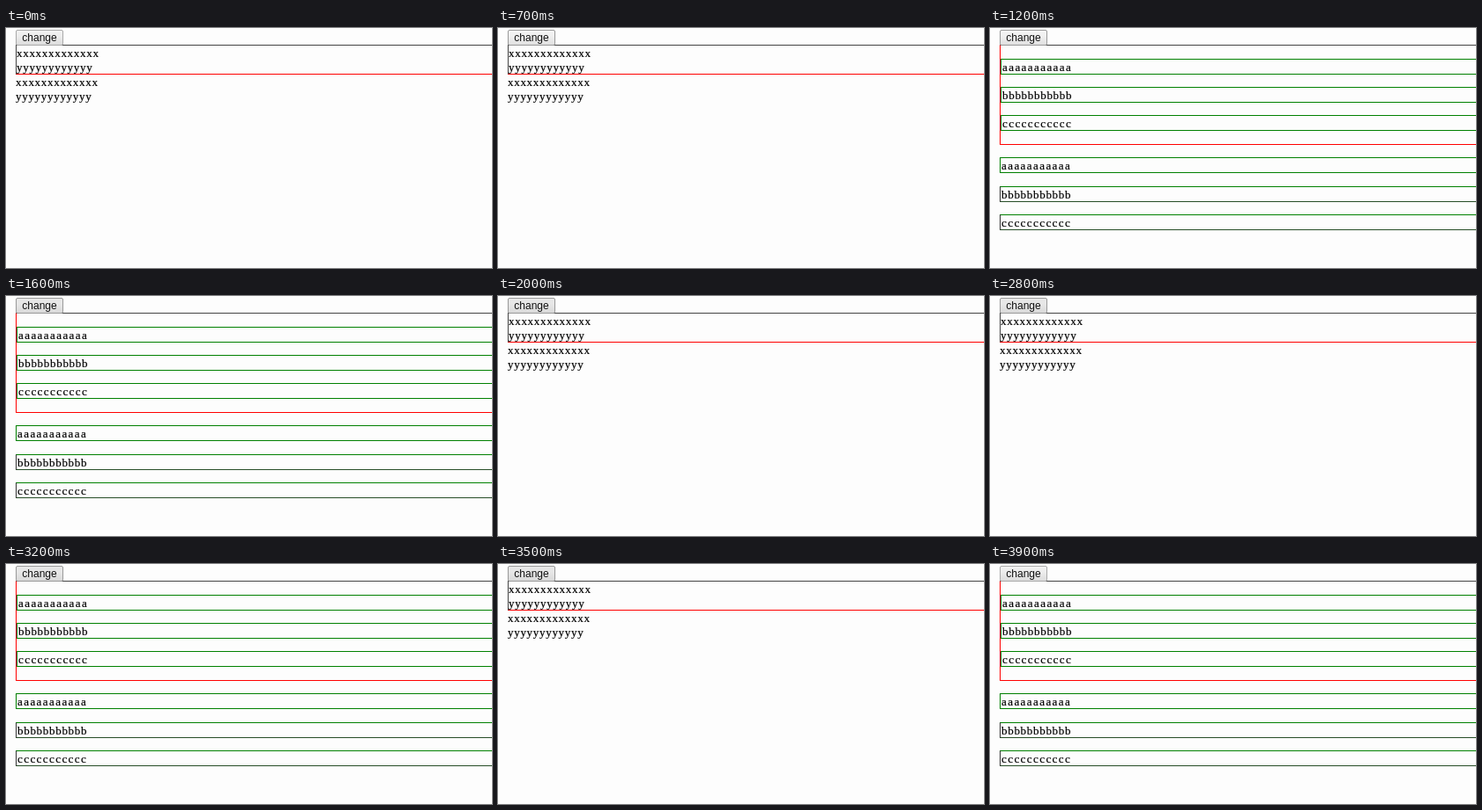
Recreate the animation shown at these times as an HTML page. Size 551x273 px, loop 4700 ms.

```html
<!DOCTYPE html>
<html lang="en">
<head>
<meta charset="utf-8">
<title>change</title>
<style>
  html, body { margin: 0; width: 100%; height: 100%; overflow: hidden; background: #fdfdfd; }
  .stage { position: relative; width: 551px; height: 273px; overflow: hidden; }
  .stage * { position: absolute; box-sizing: border-box; margin: 0; }

  .view { inset: 0; animation: 4.7s step-end infinite; }
  .plain { animation-name: plain; }
  .items { animation-name: items; }

  .frame { left: 11px; top: 19px; width: 560px; border: 1px solid #f00; border-top-color: #444; }
  .plain .frame { height: 34px; border-left-color: #444; }
  .items .frame { height: 114px; }

  /* Serif letters on a fixed 7.2px pitch */
  p {
    --advance: .5em;
    left: 11px; height: 18px;
    font: 13px/18px "Liberation Serif", "Times New Roman", serif;
    letter-spacing: calc(7.2px - var(--advance));
    white-space: nowrap; color: #000;
    -webkit-text-stroke: .2px #000;
  }
  .narrow { --advance: .444em; }
  .items p { width: 560px; border: 1px solid #008000; line-height: 18px; padding-left: 1px; }
  .items .inner { left: 12px; }
  .items .dark { border-left-color: #333; border-bottom-color: #264d26; }

  .button {
    left: 11px; top: 2px; width: 54px; height: 18px;
    border: 1px solid #a9a9a9; border-radius: 2px;
    background: linear-gradient(#f2f2f2, #ededed 38%, #dcdcdc);
    font: 12px/16px "Liberation Sans", Arial, sans-serif;
    text-align: center; color: #111;
    animation: button 4.7s step-end infinite;
  }

  @keyframes plain {
    0%, 36.17%, 55.31%, 70.21% { visibility: visible; }
    25.53%, 46.8%, 61.7%, 76.59%, 100% { visibility: hidden; }
  }
  @keyframes items {
    0%, 36.17%, 55.31%, 70.21% { visibility: hidden; }
    25.53%, 46.8%, 61.7%, 76.59%, 100% { visibility: visible; }
  }
  @keyframes button {
    0%, 82.97%, 100% {
      border-color: #a9a9a9;
      background: linear-gradient(#f2f2f2, #ededed 38%, #dcdcdc);
    }
    14.89%, 25.53%, 36.17%, 46.8%, 55.31%, 61.7%, 70.21%, 76.59% {
      border-color: #999;
      background: linear-gradient(#f4f4f4, #f0f0f0 38%, #e0e0e0);
    }
    23.4%, 34.04%, 42.55%, 53.19%, 59.57%, 68.08%, 74.46% {
      border-color: #999;
      background: linear-gradient(#e7e7e7, #e7e7e7 38%, #d9d9d9);
    }
  }
</style>
</head>
<body>
<div class="stage">
  <div class="view plain">
    <div class="frame"></div>
    <p style="left:12px;top:20px">xxxxxxxxxxxxx</p>
    <p style="left:12px;top:36px">yyyyyyyyyyyy</p>
    <p style="top:53px">xxxxxxxxxxxxx</p>
    <p style="top:69px">yyyyyyyyyyyy</p>
  </div>
  <div class="view items">
    <div class="frame"></div>
    <p class="inner narrow" style="top:35px">aaaaaaaaaaa</p>
    <p class="inner" style="top:67px">bbbbbbbbbbb</p>
    <p class="inner narrow" style="top:99px">ccccccccccc</p>
    <p class="narrow" style="top:147px">aaaaaaaaaaa</p>
    <p class="dark" style="top:180px">bbbbbbbbbbb</p>
    <p class="dark narrow" style="top:212px">ccccccccccc</p>
  </div>
  <div class="button">change</div>
</div>
</body>
</html>
```
